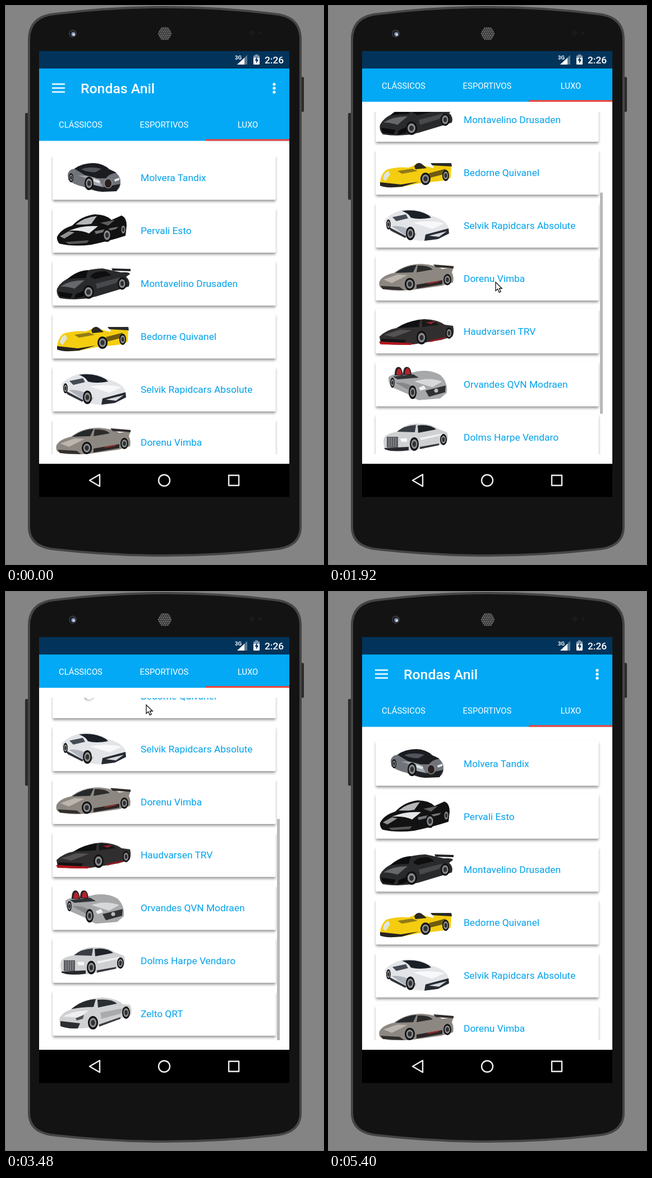
An HTML page that plays this animation: 565 by 991 pixels, repeating every 5760 ms.

```html
<!DOCTYPE html>
<html lang="pt">
<head>
<meta charset="utf-8">
<title>Lista de carros</title>
<style>
  html, body { margin: 0; width: 100%; height: 100%; overflow: hidden; background: #848484; }
  svg { display: block; width: 565px; height: 991px; font-family: Roboto, sans-serif; }
</style>
</head>
<body>
<svg id="stage" viewBox="0 0 565 991" xmlns="http://www.w3.org/2000/svg"></svg>
<script>
const LOOP = 5760, STEP = 120, PITCH = 94, LIST_BOTTOM = 796, CONTENT = 941, BAR_SHIFT = 69.4;

const path = (d, fill) => `<path d="${d}" fill="${fill}"/>`;
const oval = (x, y, rx, ry, fill) => `<ellipse cx="${x}" cy="${y}" rx="${rx}" ry="${ry}" fill="${fill}"/>`;
const rect = (x, y, w, h, fill, more = '') => `<rect x="${x}" y="${y}" width="${w}" height="${h}" fill="${fill}" ${more}/>`;
const label = (x, y, size, text, more = '') => `<text x="${x}" y="${y}" font-size="${size}" ${more}>${text}</text>`;
const wheel = (x, y, rx, ry) => oval(x, y, rx, ry, '#111') + oval(x, y, rx * .7, ry * .7, '#8a8c8f')
  + oval(x, y, rx * .4, ry * .4, '#2f3032');

// Each car is a few flat shapes, measured from the top of its card.
const cars = [
  ['Molvera Tandix',
    path('M110 36Q111 26 122 25Q136 15 156 15Q174 16 184 26Q202 32 204 46Q205 60 197 64L172 65Q150 64 138 57Q120 53 111 45Z', '#70747a') +
    path('M122 25Q136 15 156 15Q174 16 184 26L197 32Q184 34 178 42L160 42 140 36Z', '#1a1c20') +
    path('M134 26Q148 20 170 25L160 31Q146 32 134 26Z', '#50555c') +
    path('M128 37Q150 36 166 44L172 56 158 55Q150 42 128 37Z', '#a3a7ac') +
    path('M154 53L172 58 204 52 197 65 172 66Q156 65 152 60Z', '#1d1f22') +
    oval(182, 51, 8, 9, '#85878a') + oval(182, 51, 6, 7.5, '#2a1f20') +
    path('M156 43l12 4-2 4-10-4zM193 44l9-3v4l-8 3z', '#e3e6ea') + wheel(148, 51, 8, 12) + wheel(116, 41, 4, 8)],
  ['Pervali Esto',
    path('M91 52Q98 38 118 32Q134 15 158 12Q178 12 188 22L206 14Q215 18 215 32L213 50 200 54Q180 60 152 66Q120 70 95 64Q90 58 91 52Z', '#121212') +
    path('M124 30Q140 17 162 15L152 29Q138 31 124 30Z', '#b4b6b8') +
    path('M112 41Q136 31 164 33L148 46Q136 40 112 41Z', '#e4e5e7') +
    path('M96 51L112 42 122 44 104 55Z', '#8f9193') + path('M168 27L194 22 182 32Z', '#5d5f62') +
    path('M158 42L200 34 196 38 160 47Z', '#737578') +
    path('M106 61L148 58 144 63 112 65Z', '#55575a') + wheel(180, 49, 8, 12) + wheel(209, 39, 5, 10)],
  ['Montavelino Drusaden',
    path('M91 50Q98 36 116 30Q138 15 172 14L205 21Q220 20 221 24L214 29Q222 36 219 46L200 52 160 64Q128 72 96 67Q89 60 91 50Z', '#292a2c') +
    path('M188 14L222 15 222 19 190 18Z', '#202124') +
    path('M108 34Q126 18 146 17L142 31Q122 31 108 34Z', '#0d0e0f') + path('M150 29Q156 18 178 19L188 26 158 33Z', '#0f0f10') +
    path('M97 46Q114 35 140 35L122 50Q110 46 97 46Z', '#66686b') + path('M160 41L204 30 196 40 162 50Z', '#48494c') +
    path('M93 55l26 4-4 8-19-3zM124 60l14-6v10l-16 4z', '#0c0c0d') + wheel(147, 56, 10, 12) + wheel(207, 41, 8, 11)],
  ['Bedorne Quivanel',
    path('M91 60Q92 44 102 36Q120 30 142 32L152 28Q158 22 168 28L186 33 187 25 218 25 217 50 205 55Q180 58 160 60L130 66Q100 68 92 62Z', '#f4cd10') +
    path('M91 58L128 62 160 57 130 66Q100 69 91 64Z', '#25241f') + path('M181 24L218 24 219 30 184 28Z', '#2a2a28') +
    path('M152 30q6-10 14-4l8 7-20 2z', '#2a2820') + path('M122 38L148 34 158 38 130 43Z', '#8f7a18') +
    path('M96 52Q98 40 106 38L109 44 101 56Z', '#dfe4dc') + path('M178 42l30-8-4 10-24 6z', '#6f5a10') +
    wheel(172, 52, 9, 11) + wheel(208, 46, 6, 10)],
  ['Selvik Rapidcars Absolute',
    path('M99 31Q114 15 140 12Q166 13 184 24Q206 30 212 42L214 54 196 64 172 68Q150 68 136 62L112 50Q99 42 99 31Z', '#e2e4e8') +
    path('M130 15Q158 11 178 23L182 27Q160 31 146 27Q142 19 130 15Z', '#1b1f26') +
    path('M113 26L137 21 141 28 120 33Z', '#444b55') + path('M150 36Q176 30 206 37L184 47Z', '#f8f8fa') +
    path('M112 42Q136 40 156 56L152 62 134 57Z', '#aeb3bb') + path('M104 42L138 60 136 63 110 50Z', '#30343a') +
    path('M172 57L213 46 214 55 194 65 170 68Z', '#262a31') + path('M178 59L210 51 196 61Z', '#d5d8dd') +
    wheel(145, 55, 8, 12) + wheel(106, 39, 4, 9)],
  ['Dorenu Vimba',
    path('M90 46Q96 35 116 31Q136 15 166 15Q190 17 202 24L222 21 219 30Q223 38 221 48L200 54 150 61Q110 65 93 58Q88 54 90 46Z', '#8d8781') +
    path('M118 31Q136 18 156 17L150 30Z', '#25282b') + path('M158 18q20-1 27 7l-29 5z', '#2b2b2b') +
    path('M186 16L222 19 222 23 190 21Z', '#302d2c') + path('M97 43L122 34 140 35 112 49Z', '#bbb5ae') +
    path('M156 52L202 44 202 51 156 59Z', '#2a2626') + path('M176 49l20-4v2l-20 4z', '#a42828') +
    path('M92 54l34 2 8 6-38-2z', '#302e2d') + wheel(144, 51, 9, 11) + wheel(211, 43, 7, 10)],
  ['Haudvarsen TRV',
    path('M90 50Q102 38 124 34Q146 20 170 19Q194 20 206 29L221 31Q224 42 220 50L200 56 150 64Q110 66 92 62Z', '#302e2f') +
    path('M120 35Q140 22 162 21L160 33Q140 34 120 35Z', '#0f1012') + path('M166 21q22 0 30 8l-30 4z', '#181819') +
    path('M98 47L126 38 148 39 116 51Z', '#555254') + path('M172 25L190 23 182 28Z', '#9d2027') +
    path('M94 54l44 2-4 5-42-2z', '#141314') + path('M89 59L150 62 146 65 92 64Z', '#b3141b') +
    path('M180 57L208 51 208 53 180 60Z', '#a5161c') + wheel(165, 52, 9, 12) + wheel(214, 44, 6, 10)],
  ['Orvandes QVN Modraen',
    path('M106 28Q116 20 148 20Q176 12 198 24Q212 36 210 56L198 66 160 69Q146 64 140 58L112 46Q105 38 106 28Z', '#a6a8aa') +
    path('M117 25q0-15 7-15 6 0 8 15zM132 24q0-15 7-14 7 0 8 14z', '#2b2325') +
    path('M120 24q1-11 5-11 4 0 5 11zM135 23q1-11 5-11 4 0 5 11z', '#b3232b') +
    path('M114 27L150 23 160 29 122 32Z', '#303235') + path('M152 36Q176 27 202 36L184 46Z', '#d7d8da') +
    path('M118 38Q136 36 152 46L158 58 140 50Z', '#85888b') +
    path('M172 52L208 43 207 55 178 63Z', '#303134') + path('M160 47l9-4 4 6-10 3z', '#f0f1f2') +
    oval(191, 52, 3.5, 3.5, '#b8babc') + wheel(149, 55, 7, 12) + wheel(113, 38, 4, 9)],
  ['Dolms Harpe Vendaro',
    path('M98 42Q102 34 122 31Q134 18 152 17Q180 15 194 26L210 32Q214 40 210 50L196 55 150 64Q112 68 99 61Q96 50 98 42Z', '#cfd0d2') +
    path('M121 31Q134 20 155 19L153 32Z', '#3a3e44') + path('M158 20q21-3 33 7l-32 6z', '#202328') +
    path('M103 40h20v19h-20z', '#585b60') + path('M107 41v17M111 41v17M115 41v17M119 41v17" stroke="#a4a6aa', 'none') +
    path('M127 43h12v6h-10z', '#f6f7f7') + path('M99 60L142 58 142 64Q112 68 99 62Z', '#26282c') +
    path('M163 42L202 34 202 37 163 46Z', '#f0f0f1') + path('M162 58L196 52 196 55 162 62Z', '#33353a') +
    wheel(152, 53, 8, 12) + wheel(204, 45, 6, 10)],
  ['Zelto QRT',
    path('M96 48Q102 37 120 32Q142 14 172 12Q198 14 208 24L221 25Q226 36 222 44L200 50 160 64Q120 71 97 63Q94 54 96 48Z', '#cfd0d2') +
    path('M116 33Q136 16 160 15L156 29Q134 29 116 33Z', '#26292d') + path('M163 16q25-2 35 7l-34 7z', '#2b2e33') +
    path('M102 46Q118 36 148 35L130 48Z', '#efeff0') + path('M168 39L210 31 204 41 170 50Z', '#a9abae') +
    path('M97 54L132 58 128 67Q108 68 97 63Z', '#2b2d31') + path('M124 49l15-6-2 7-11 3z', '#4d5156') +
    path('M166 60L204 47 204 50 166 64Z', '#3a3c40') + wheel(155, 57, 9, 12) + wheel(214, 39, 7, 11)]
];

const card = ([name, picture]) => `<g class="card">
  ${rect(83.5, 0, 397, 80, '#fff', 'rx="2" filter="url(#shadow)"')}
  <g class="picture">${picture}</g>
  <circle class="spinner" cx="148" cy="40" r="8.5" fill="none" stroke="url(#ring)" stroke-width="3.5"/>
  ${label(240, 47, 17.35, name, 'fill="#03a2ec"')}</g>`;

function speaker() {
  let dots = oval(283, 49, 12, 12, '#2a2a2a');
  for (let row = -3; row <= 3; row++)
    for (let col = -3; col <= 3; col++) {
      const x = col * 3.6 + (row % 2) * 1.8, y = row * 3.2;
      if (Math.hypot(x, y) < 11.5) dots += oval(283 + x, 49 + y, 1.2, 1.2, '#808080');
    }
  return dots;
}

const phone = rect(34, 190, 7, 154, '#2b2b2b', 'rx="2"') + rect(524, 126, 7, 62, '#2b2b2b', 'rx="2"') +
  `<path d="M41 60Q41 18 88 14Q283-10 478 14Q525 18 525 60V925Q525 961 478 965Q283 987 88 965Q41 961 41 925Z" fill="#131313" stroke="#454545" stroke-width="4"/>` +
  oval(119, 49, 7, 7, '#3a3a3a') + oval(118.5, 49, 5.2, 5.2, '#182030') + oval(120, 50, 3.4, 3.4, '#8d9cb8') + oval(121, 51, 1.8, 1.8, '#e4e9f2') +
  speaker() + oval(438, 48, 4.5, 4.5, '#1c1918') + oval(453, 48, 3, 3, '#1c1918');

const statusBar = rect(59, 80, 446, 31, '#02345b') + `<g fill="#fff">` +
  label(408, 95, 9.5, '3G', 'font-weight="700"') +
  path('M412 104L430 104 430 87Z" opacity=".35', '#fff') + path('M412 104H425V92Z', '#fff') +
  rect(441, 88, 11, 16, '#fff', 'rx="1"') + rect(444, 86, 5, 3, '#7f97ab') + rect(441, 88, 11, 4, '#7f97ab') +
  path('M447.5 90l-4 7h2.5v5l4-7h-2.5z', '#02345b') +
  label(461, 102, 17.35, '2:26', 'font-weight="500"') + `</g>`;

const appBar = rect(59, 111, 446, 128.5, '#03a9f4') + `<g fill="#fff">` +
  [-7, 0, 7].map(dy => rect(82, 144.5 + dy, 23, 2.4, '#fff') + oval(478, 146 + dy, 2.6, 2.6, '#fff')).join('') +
  label(133, 155, 24.8, 'Rondas Anil', 'font-weight="500"') +
  [[133, 'CLÁSSICOS'], [282, 'ESPORTIVOS'], [431, 'LUXO']]
    .map(([x, text]) => label(x, 216, 14.87, text, 'text-anchor="middle"')).join('') +
  `</g>` + rect(356, 236.5, 149, 3, '#f44336');

const navBar = rect(59, 813, 446, 59, '#000') + `<g fill="none" stroke="#eee" stroke-width="2.4" stroke-linejoin="round">
  <path d="M149 842.5L167 832V853Z"/><circle cx="282" cy="842.5" r="10"/><rect x="397" y="833.5" width="18" height="18"/></g>`;

document.getElementById('stage').innerHTML = `<defs>
  <filter id="shadow" x="-5%" y="-15%" width="110%" height="140%">
    <feDropShadow dx="0" dy="3.4" stdDeviation="1.9" flood-color="#000" flood-opacity=".38"/></filter>
  <linearGradient id="ring" x1="0" y1="1" x2="1" y2="0"><stop offset=".1" stop-color="#7d7d7d"/><stop offset=".95" stop-color="#eee"/></linearGradient>
  <clipPath id="listClip"><rect id="listWindow" x="76" y="257" width="412" height="539"/></clipPath>
  <clipPath id="barClip"><rect x="59" y="111" width="446" height="129"/></clipPath></defs>
  ${rect(0, 0, 565, 991, '#848484')}${phone}${rect(59, 111, 446, 702, '#fff')}
  <g clip-path="url(#listClip)">${cars.map(card).join('')}
    <path id="glow" d="M76 784Q282 766 488 784V796H76Z" fill="#03a0e0"/>
    <rect id="thumb" x="483" width="5" fill="#b8b8b8"/></g>
  <g clip-path="url(#barClip)"><g id="appBar">${appBar}</g></g>
  ${statusBar}${navBar}
  <path id="cursor" d="M0 .5V15.8L3.7 12.5 6.3 18.6 9.1 17.4 6.5 11.5H11.3Z" fill="#fff" stroke="#111" stroke-width="1.3"/>`;

const $ = id => document.getElementById(id);
const cardNodes = [...document.querySelectorAll('.card')];

const cursorKeys = [[240, 252, 659], [360, 252, 659], [480, 256, 640], [840, 292, 426], [960, 300, 385],
  [1320, 304, 355], [1560, 307, 338], [1680, 310, 316], [1800, 310, 316], [2160, 270, 839], [2400, 262, 909],
  [3000, 230, 640], [3480, 250, 200], [3600, 250, 195], [4320, 317, 326], [4560, 322, 530], [4680, 330, 480], [4920, 360, 26]];
const scrollKeys = [[480, 0], [720, 44], [840, 92], [960, 333], [1800, 333], [2160, 0],
  [3000, 0], [3240, 90], [3360, 290], [3480, 333], [4320, 333], [4680, 0]];
const thumbKeys = [[480, 0], [600, 1], [1200, 1], [1440, 0], [1800, 0], [1920, 1], [2520, 1], [2760, 0],
  [3000, 0], [3120, 1], [3840, 1], [4080, 0], [4320, 0], [4440, 1], [4800, 1], [5040, 0]];
const glowKeys = [[960, 0], [1080, .15], [1320, .1], [1560, 0]];
const barHidden = [[960, 2040], [3360, 4440]];
const cursorShown = [[240, 2520], [3000, 5040]];
const loading = { 0: [[2040, 2520], [4440, 4800]], 2: [[2040, 2640], [4440, 4920]], 3: [[3360, 3600]] };

const within = (spans, t) => spans.some(([from, to]) => t >= from && t < to);

function track(keys, t) {
  const next = keys.findIndex(key => key[0] > t);
  if (next < 1) return keys.at(next).slice(1);
  const a = keys[next - 1], b = keys[next], k = (t - a[0]) / (b[0] - a[0]);
  return a.slice(1).map((v, i) => v + (b[i + 1] - v) * k);
}

function draw(t) {
  const hidden = within(barHidden, t), top = hidden ? 188 : 257, view = LIST_BOTTOM - top;
  const scroll = Math.min(track(scrollKeys, t)[0], CONTENT - view);

  $('appBar').setAttribute('transform', `translate(0 ${hidden ? -BAR_SHIFT : 0})`);
  $('listWindow').setAttribute('y', top);
  $('listWindow').setAttribute('height', view);
  cardNodes.forEach((node, i) => {
    const busy = within(loading[i] || [], t), spinner = node.querySelector('.spinner');
    node.setAttribute('transform', `translate(0 ${Math.round(top + 7 + PITCH * i - scroll)})`);
    node.querySelector('.picture').style.display = busy ? 'none' : '';
    spinner.style.display = busy ? '' : 'none';
    spinner.setAttribute('transform', `rotate(${(t - 2160) * .36} 148 40)`);
  });

  $('thumb').setAttribute('y', top + scroll * view / CONTENT);
  $('thumb').setAttribute('height', view * view / CONTENT);
  $('thumb').setAttribute('opacity', track(thumbKeys, t)[0]);
  $('glow').setAttribute('opacity', track(glowKeys, t)[0]);

  const [x, y] = track(cursorKeys, t).map(Math.round);
  $('cursor').setAttribute('transform', `translate(${x} ${y})`);
  $('cursor').style.display = within(cursorShown, t) ? '' : 'none';
}

const start = performance.now();
function tick() {
  const t = (performance.now() - start) % LOOP;
  draw(Math.floor(t / STEP) * STEP);
  requestAnimationFrame(tick);
}
tick();
</script>
</body>
</html>
```
